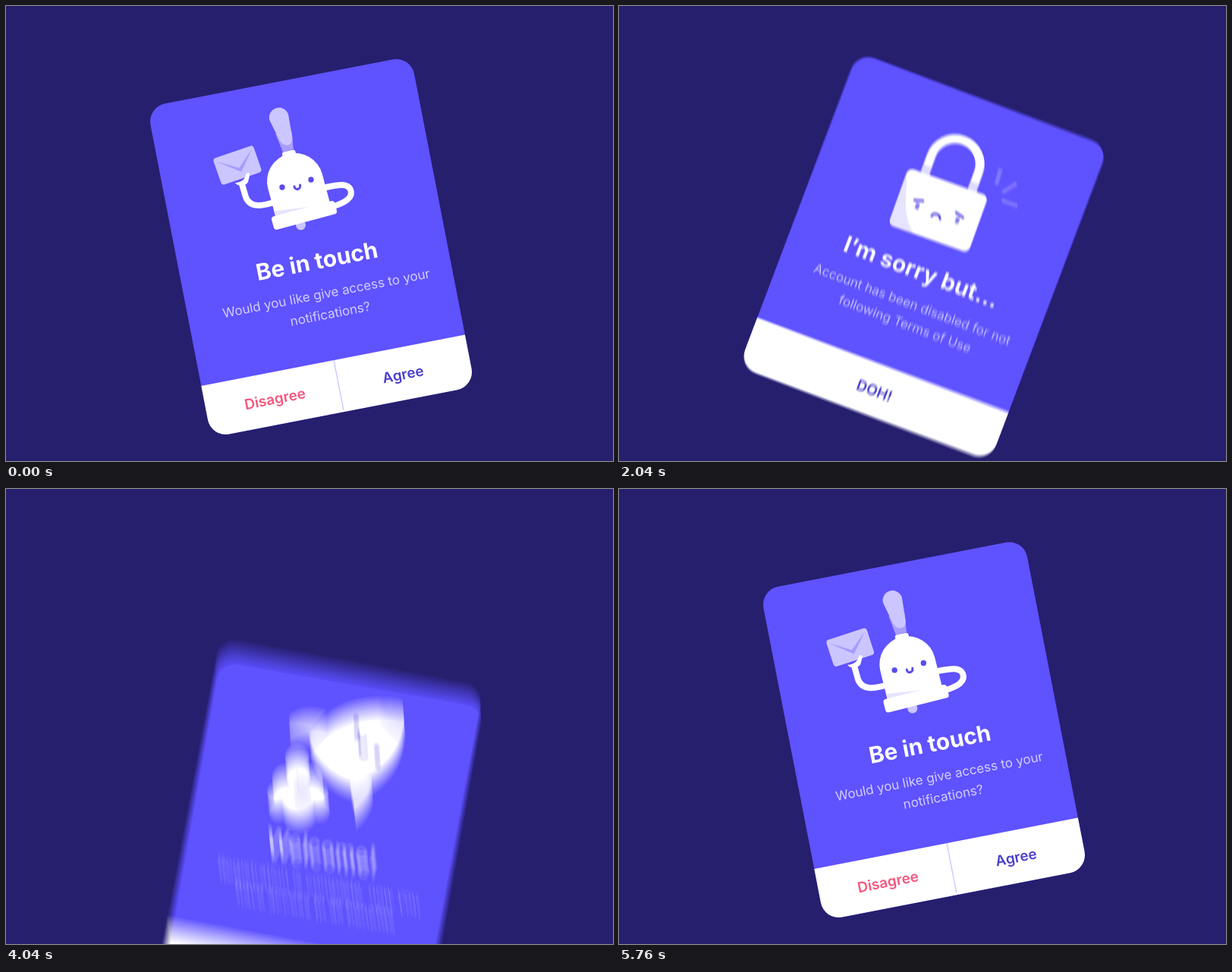
An HTML page with a canvas for the animation above (5800 ms loop, 800 by 600 pixels).

```html
<!DOCTYPE html>
<html lang="en">
<head>
<meta charset="utf-8">
<title>Alert cards</title>
<style>
  html, body { margin: 0; width: 100%; height: 100%; overflow: hidden; background: #261f6e; }
  canvas { display: block; }
</style>
</head>
<body>
<canvas id="stage" width="800" height="600"></canvas>
<script>
const LOOP = 5800, STEP = 40, SHUTTER = 20, SAMPLES = 16;
const EXIT = 520;
const RAD = Math.PI / 180;
const BG = '#261f6e', CARD = '#5f52ff', PALE = '#cbc6ff', MID = '#a69dff',
      SHADE = '#e6e3ff', FACE = '#5a4cee', LINK = '#4b3fcb', PINK = '#f4577d';

const out = document.getElementById('stage').getContext('2d');
const buffer = document.createElement('canvas');
buffer.width = 800;
buffer.height = 600;
const c = buffer.getContext('2d', { alpha: false });

// ---------- drawing helpers ----------
function fill(color, d) {
  c.fillStyle = color;
  c.fill(new Path2D(d));
}

function line(color, width, d, cap = 'round') {
  c.strokeStyle = color;
  c.lineWidth = width;
  c.lineCap = cap;
  c.lineJoin = 'round';
  c.stroke(new Path2D(d));
}

function dot(color, x, y, r) {
  c.fillStyle = color;
  c.beginPath();
  c.arc(x, y, r, 0, 7);
  c.fill();
}

function box(color, x, y, w, h, r) {
  c.fillStyle = color;
  c.beginPath();
  c.roundRect(x, y, w, h, r);
  c.fill();
}

function text(str, x, y, font, color) {
  c.font = font + ' Inter, sans-serif';
  c.fillStyle = color;
  c.fillText(str, x, y);
}

function at(x, y, deg, draw) {
  c.save();
  c.translate(x, y);
  c.rotate(deg * RAD);
  draw();
  c.restore();
}

// Run a drawing laid out on a card placed at (x, y) and turned by deg.
function layout(x, y, deg, draw) {
  c.save();
  c.rotate(-deg * RAD);
  c.translate(-x, -y);
  draw();
  c.restore();
}

// ---------- illustrations ----------
function bell(t) {
  const sway = -4 * Math.sin(t / 1000 * 2 * Math.PI);
  layout(402, 317.5, -11, () => {
    c.translate(373, 192);
    c.rotate(sway * RAD);
    c.translate(-373, -192);

    fill(MID, 'M355 168 L376 164 L379 189 L365 193 Z');
    fill(PALE, 'M347.5 151 A12.8 12.8 0 0 1 372 143 L377.5 174 C378 185 367 187 361 178 Z');
    dot(PALE, 388.5, 289, 6.5);
    line('#fff', 8, 'M422 239 C440 235 450 234 454 242 C458 252 448 259 432 264');
    line('#fff', 8, 'M356 258 C338 264 322 267 316 252 L311 235');

    at(305, 210, -19, () => {
      box(PALE, -28, -18.5, 56, 37, 4);
      fill(MID, 'M-25 -14 L1 4 L25 -14 L2 10 Z');
    });
    fill('#fff', 'M302 233 C307 233 314 231 316 223 C317 219 322 219 321 224 L319 232 C317 237 305 239 302 233 Z');

    at(373, 195, -13, () => box('#fff', -9, -4, 18, 9, 3));
    at(381, 231, -15, () => {
      fill('#fff', 'M-37 0 A37 37 0 0 1 37 0 V40 H-37 Z');
      fill(SHADE, 'M-37 31 L10 37.5 H-37 Z');
      box('#fff', -43, 37.5, 86, 18, 4);
    });
    dot(FACE, 364, 239, 3.7);
    dot(FACE, 402, 229, 3.7);
    line(FACE, 3, 'M380 238 C381 244 389 242 387.5 236');
  });
}

function lock(t) {
  const shut = Math.min(1, Math.max(0, (t - 1760) / 120));
  const lift = 7 * (1 - shut * shut);
  layout(402, 335, 21, () => {
    at(421.5, 274, 20, () => {
      c.save();
      c.translate(0, -lift);
      line('#fff', 12, 'M-33 -30 V-65 A33 33 0 0 1 33 -65 V-30', 'butt');
      line('#dedbff', 12, 'M-33 -50 V-38 M33 -50 V-38', 'butt');
      c.restore();

      box('#fff', -56, -40, 112, 80, 8);
      fill(SHADE, 'M-56 -28 C-48 -22 -48 20 -20 40 H-48 Q-56 40 -56 32 Z');
      line(FACE, 3, 'M-34 -2 L-23 -5 M23 -5 L34 -2');
      line('#8b80f4', 5, 'M-28 0 V8 M28 0 V8', 'butt');
      line(FACE, 3, 'M-6 10 C-4 4 4 4 6 10');
    });
    if (t >= 1880 && t < 2300) {
      line('#8277ff', 6, 'M504 219 L498 241 M525 239 L506 251 M505 261 L526 269', 'butt');
    }
  });
}

function toaster(t) {
  const slide = Math.max(-3, Math.min(4, (t - 2800) / 70));
  layout(402, 317.5, -11, () => {
    at(389, 254.5, -10, () => {
      box(PALE, -48, 42, 16, 10, 3);
      box(PALE, 32, 42, 16, 10, 3);
      box(PALE, 66, 2 + slide, 8, 7.5, [0, 4, 4, 0]);
      box('#fff', -64, -47, 128, 94, [24, 24, 8, 8]);
    });
    dot(FACE, 366, 271.5, 4);
    dot(FACE, 414, 263, 4);
    line(FACE, 3.2, 'M387 270 C387 279 396 278 395 269');
  });
}

function rocket(t) {
  layout(416, 457, 10.8, () => {
    const puffs = [[385, 363, 15], [370, 391, 18], [400, 392, 20], [358, 409, 12],
                   [386, 413, 22], [412, 409, 15]];
    puffs.forEach(([x, y, r], i) => dot('#fff', x, y, r + Math.sin(t / 90 + i * 2)));
    dot(SHADE, 391, 397, 11);

    fill('#e2dfff', 'M375 308 C388 297 405 296 424 302 L404 327 C394 322 384 322 375 323 Z');
    fill('#e2dfff', 'M455 393 L483 390 C485 405 474 424 460 434 C460 424 458 412 455 404 Z');
    fill('#fff', 'M524 289 C476 278 424 292 401 334 C406 366 432 390 462 397 C510 378 533 338 524 289 Z');
    fill(SHADE, 'M524 289 C512 286 503 285 492 286 C499 302 510 315 526 322 C527 311 526 300 524 289 Z');
    dot(FACE, 463, 311, 3.8);
    dot(FACE, 490, 350, 3.8);
    line(FACE, 3, 'M467 330 C464 338 472 342 476 336');
  });
}

// ---------- cards ----------
const cards = [
  { enter: -440, leave: 360, rest: -11, turn: -12, drift: .04, art: bell,
    title: 'Be in touch', lines: ['Would you like give access to your', 'notifications?'],
    buttons: ['Disagree', 'Agree'] },
  { enter: 1000, leave: 1840, rest: 13, turn: 10, drift: .085, art: lock,
    title: 'I’m sorry but...', lines: ['Account has been disabled for not', 'following Terms of Use'],
    buttons: ['DOH!'] },
  { enter: 2440, leave: 3200, rest: -11, turn: -12, drift: .04, art: toaster,
    title: 'Keep them coming!', lines: ['Congrats, you have created and', 'shared your first post'],
    buttons: ['Thank You!'] },
  { enter: 3880, leave: 4680, rest: 13, turn: 5.8, drift: .1, art: rocket,
    title: 'Welcome!', lines: ['Registration is complete, now you', 'have access to all benefits'],
    buttons: ['Let’s go!'] }
];

function pose(card, t) {
  const left = Math.min(1, Math.max(0, (card.enter + 370 - t) / 380));
  const rise = 575 * left ** 2.35;
  const u = Math.max(0, (t - card.leave) / EXIT);
  const fall = 592 * u ** 4;
  const spin = 1 - (1 - Math.min(1, u)) ** 3;
  return {
    x: 402 + card.drift * rise - Math.sign(card.rest) * .022 * fall,
    y: 317.5 + rise + fall,
    deg: card.rest - .019 * rise + card.turn * spin,
    moving: left > 0 || u > 0
  };
}

function drawCard(card, p, t) {
  at(p.x, p.y, p.deg, () => {
    box(CARD, -177, -222, 354, 444, 24);
    box('#fff', -177, 152.5, 354, 69.5, [0, 0, 24, 24]);
    card.art(t);

    c.textAlign = 'center';
    text(card.title, 4, 30.5, '700 30px', '#fff');
    card.lines.forEach((s, i) => text(s, 8, 70 + 27.5 * i, '400 17px', '#d3cfff'));
    const [first, second] = card.buttons;
    const font = '600 19px';
    if (second) {
      text(first, -85, 194.5, font, PINK);
      text(second, 87, 195, font, LINK);
      line('#c5bfff', 1.2, 'M1 152.5 V219', 'butt');
    } else {
      text(first, 1.5, 195, font, LINK);
    }
  });
}

function paint(t, card) {
  c.setTransform(1, 0, 0, 1, 0, 0);
  c.fillStyle = BG;
  c.fillRect(0, 0, 800, 600);
  if (card) drawCard(card, pose(card, t), t);
}

function render(t) {
  const time = t >= 5340 ? t - LOOP : t;
  const card = cards.find(k => time >= k.enter && time < k.leave + EXIT);
  const count = card && pose(card, time).moving ? SAMPLES : 1;
  // Averaging the poses across the open shutter gives the motion blur.
  for (let i = 0; i < count; i++) {
    const shift = count > 1 ? SHUTTER * (i / (count - 1) - .5) : 0;
    paint(time + shift, card);
    out.globalAlpha = 1 / (i + 1);
    out.drawImage(buffer, 0, 0);
  }
}

let shown = -1;
const start = performance.now();
function tick() {
  const t = Math.floor((performance.now() - start) % LOOP / STEP) * STEP;
  if (t !== shown) {
    shown = t;
    render(t);
  }
  requestAnimationFrame(tick);
}
tick();
</script>
</body>
</html>
```
